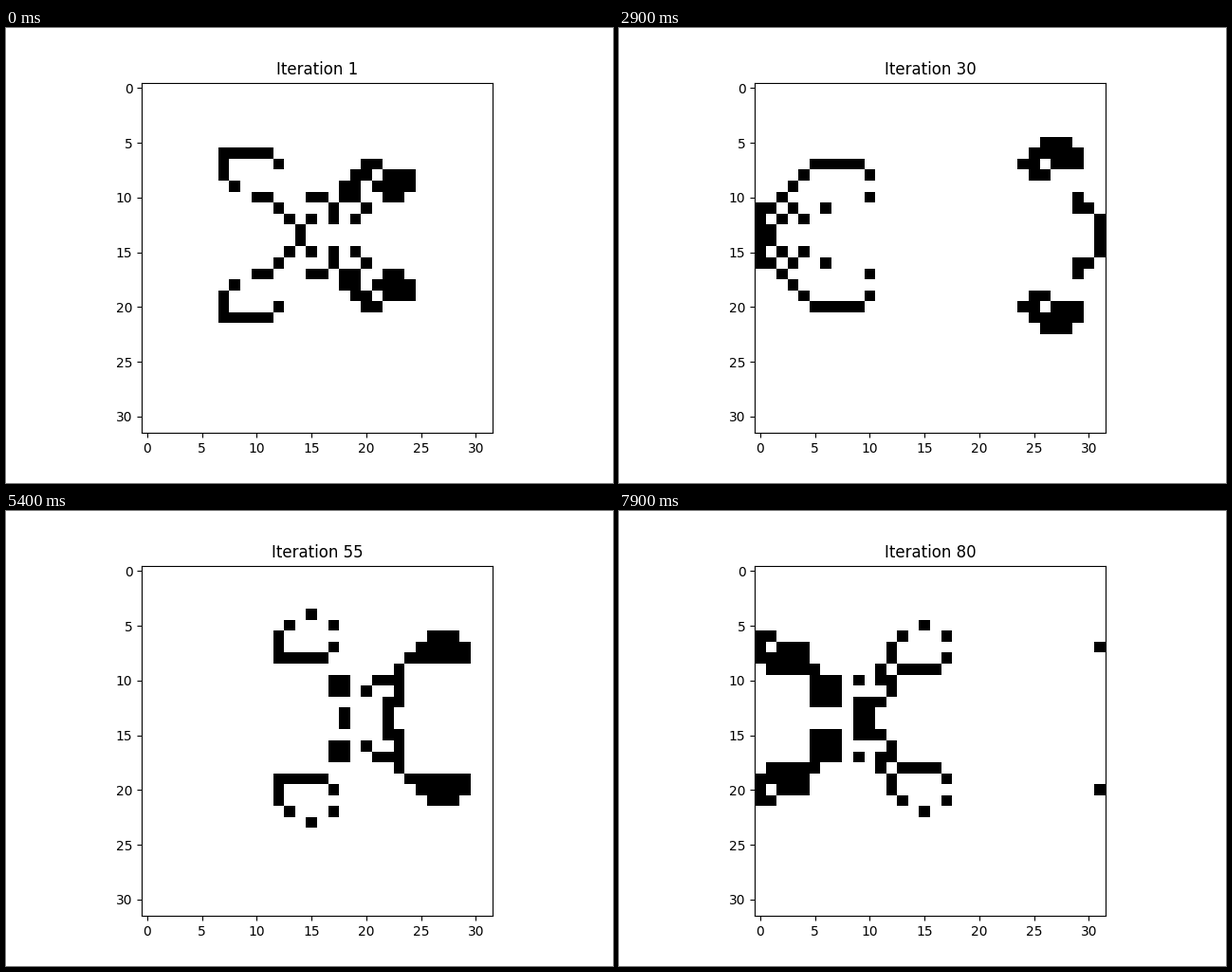
Write a matplotlib script that moves like this. It is 640 px wide and 480 px high and loops after 8 s.

```python
import numpy as np
import matplotlib.pyplot as plt
from matplotlib.animation import FuncAnimation

SIZE = 32
FRAMES = 80
INTERVAL = 100

# Upper half of the ship; the lower half is its mirror image.
HALF = [
    "OOOOO.............",
    "O....O.......OO...",
    "O...........OO.OOO",
    ".O.........OO.OOOO",
    "...OO...OO.OO..OO.",
    ".....O....O..O....",
    "......O.O.O.O.....",
    ".......O..........",
]
TOP, LEFT = 6, 7


def seed():
    ship = np.array([[c == "O" for c in row] for row in HALF + HALF[::-1]])
    grid = np.zeros((SIZE, SIZE), dtype=int)
    h, w = ship.shape
    grid[TOP:TOP + h, LEFT:LEFT + w] = ship
    return grid


def step(grid):
    """One Game of Life generation on a torus."""
    near = sum(np.roll(grid, (dy, dx), axis=(0, 1))
               for dy in (-1, 0, 1) for dx in (-1, 0, 1) if dy or dx)
    return ((near == 3) | ((grid == 1) & (near == 2))).astype(int)


states = [seed()]
while len(states) < FRAMES:
    states.append(step(states[-1]))

fig, ax = plt.subplots(figsize=(6.4, 4.8), dpi=100)
image = ax.imshow(states[0], cmap="binary", vmin=0, vmax=1,
                  interpolation="nearest")
title = ax.set_title("Iteration 1")


def update(i):
    image.set_data(states[i])
    title.set_text(f"Iteration {i + 1}")
    return image, title


anim = FuncAnimation(fig, update, frames=FRAMES, interval=INTERVAL,
                     repeat=True, repeat_delay=0, blit=False)
plt.show()
```
